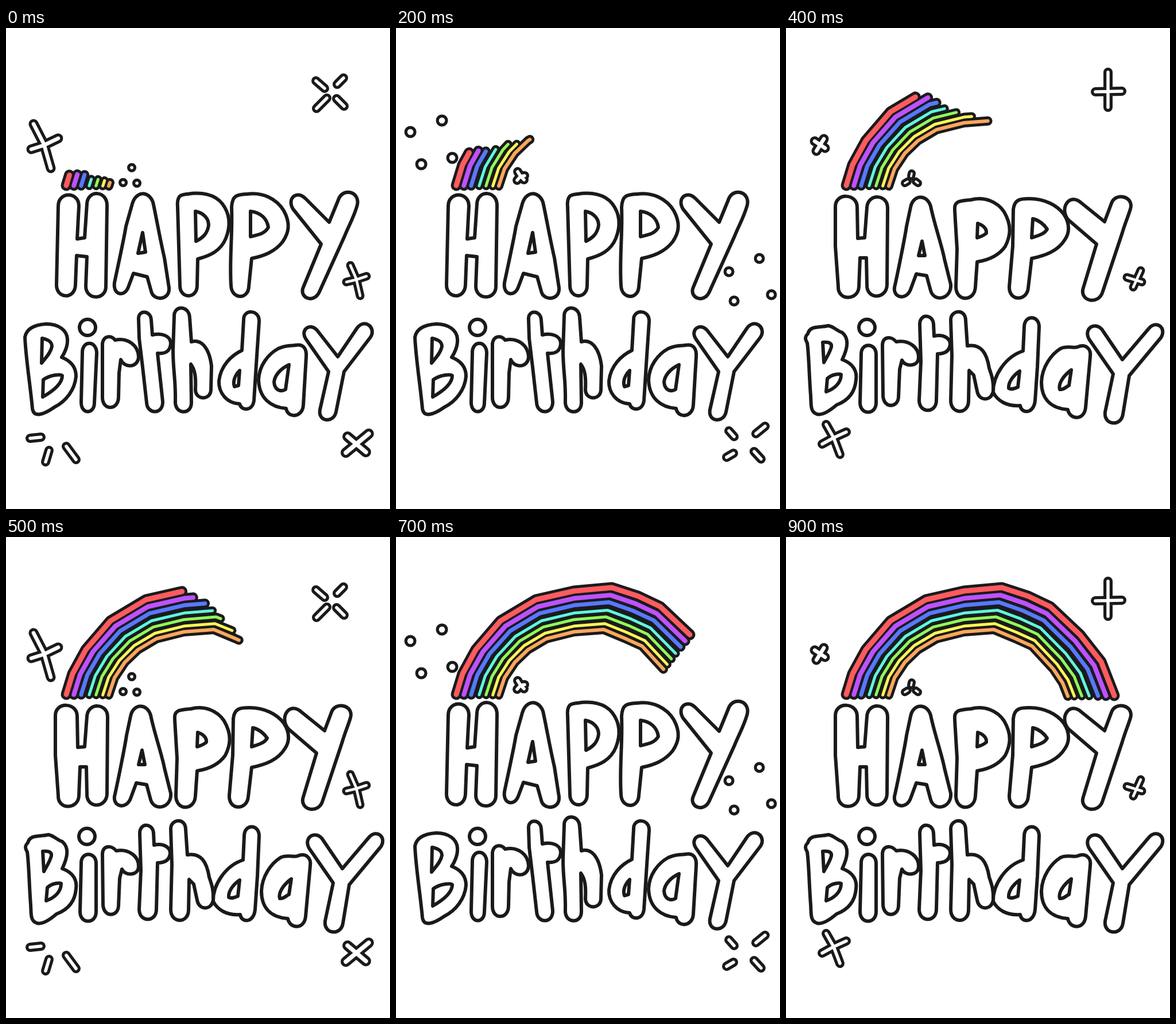
An HTML page with a canvas that plays this animation: 669 by 837 pixels, repeating every 1000 ms.

```html
<!DOCTYPE html>
<html lang="en">
<head>
<meta charset="utf-8">
<title>Happy Birthday</title>
<style>
html, body { margin: 0; width: 100%; height: 100%; overflow: hidden; background: #fff; }
canvas { display: block; }
</style>
</head>
<body>
<canvas id="stage" width="669" height="837"></canvas>
<script>
const ctx = document.getElementById('stage').getContext('2d');
const INK = '#1a1a1c';
const STEP = 100;

// Two hand-drawn poses of the lettering, one path per letter.
const poses = [[
  'M91 310C91 284 127 284 127 310L124 367 137 365 141 306C142 281 177 282 176 310L174 450C174 474 139 474 139 449L141 398 123 396 121 446C121 473 87 472 88 446Z',
  'M220 306C226 284 248 282 256 303C262 330 268 366 276 400L284 452C286 474 257 476 253 458L246 433 222 427 213 451C207 468 186 466 189 443C192 428 205 370 209 345ZM238 356L230 392 243 390Z',
  'M299 312C297 290 306 290 316 289C340 285 364 289 377 306C392 326 391 346 383 366C374 388 356 396 334 402L333 448C333 472 303 472 303 448ZM330 319C345 322 353 332 353 343C351 359 341 366 331 371Z',
  'M393 312C394 290 404 290 420 289C448 285 472 298 484 318C496 340 493 356 482 372C468 390 448 397 428 401L423 450C422 473 393 473 392 448C389 400 395 360 393 312ZM426 319C444 321 455 332 457 347C450 359 438 360 426 363Z',
  'M522 297L563 338 579 299C586 277 617 284 612 308C606 330 596 346 590 362L546 459C536 481 510 469 518 451L549 376 500 315C489 297 506 281 522 297Z',
  'M33 538C36 520 56 516 70 515C92 515 106 526 107 541C108 553 102 566 97 573C115 580 122 592 122 606C120 630 104 650 84 660C64 674 48 678 46 662C42 620 34 570 33 538ZM63 540C72 542 80 545 80 554C78 566 68 575 62 583ZM65 612C78 603 96 602 98 605C98 620 78 634 64 642Z',
  'M128 521a14 14 0 1 1 28 0a14 14 0 1 1-28 0ZM133 566C132 543 158 543 158 566L154 652C154 673 130 673 131 650Z',
  'M168 549C170 535 184 534 190 543C212 538 230 552 231 572C230 592 206 592 200 577L197 600 196 642C196 666 168 666 168 643Z',
  'M231 508C229 490 252 490 253 508L255 534C272 530 287 536 287 549C286 564 276 567 264 566L273 650C274 673 246 673 245 652L238 590 232 540Z',
  'M293 502C292 482 319 482 320 504L323 546C340 541 354 556 358 588L357 630C356 648 331 648 330 630C331 610 330 595 322 585L323 652C323 673 296 673 295 652C296 610 291 600 291 560Z',
  'M414 508C413 489 442 489 441 511L437 570 432 648C430 667 410 667 407 654C384 653 370 634 371 614C374 588 392 570 411 561ZM407 596C398 605 395 616 398 624L405 622Z',
  'M440 612C441 588 456 568 474 558C488 551 500 553 504 552C518 549 524 558 523 572L518 656C517 678 491 680 488 662C462 660 441 645 440 612ZM493 586C476 594 468 606 467 616C468 630 478 634 487 629Z',
  'M542 526L578 572 611 523C624 504 646 521 635 538L589 598 575 668C571 688 543 686 547 664L562 598 523 542C511 525 530 512 542 526Z'
], [
  'M86 312C85 286 124 287 124 312L125 366 137 365 141 312C143 287 177 289 177 313L176 446C176 473 140 473 141 447L140 400 129 400 127 450C126 475 90 475 91 450L86 380Z',
  'M217 312C221 290 245 288 252 310C258 340 272 380 276 402L287 446C289 472 258 478 252 457L245 431 227 428 217 455C209 476 183 469 190 447C196 420 208 360 210 345ZM237 371L231 396 242 396Z',
  'M294 318C292 300 304 301 322 299C346 293 368 302 380 320C394 344 391 362 382 380C370 397 352 404 333 407L330 450C329 477 296 477 296 450L298 385ZM334 340C344 343 350 350 349 357C344 362 339 363 333 365Z',
  'M396 316C398 298 408 297 424 297C450 297 472 308 484 324C496 342 493 358 486 368C474 388 452 396 428 401L422 452C420 476 388 476 389 450L395 380ZM430 332C440 334 450 342 455 350C450 359 440 361 428 365Z',
  'M514 304L555 337 567 305C574 285 607 293 600 315C596 328 590 342 586 356L552 458C545 484 510 475 518 452L541 376 492 334C475 314 494 286 514 304Z',
  'M37 548C32 540 34 536 38 532C42 517 58 522 74 518C84 520 90 528 98 530C110 540 108 556 98 577C118 584 124 598 122 612C120 638 104 650 88 656C74 668 62 674 54 672C42 668 44 656 43 640C40 600 40 570 37 548ZM64 547C76 546 80 549 79 555C76 566 70 574 66 582ZM72 610C82 601 94 602 96 603C96 618 84 628 70 633Z',
  'M127 521a14 14 0 1 1 28 0a14 14 0 1 1-28 0ZM131 568C130 547 157 547 157 568L157 652C157 674 129 674 129 652Z',
  'M168 552C168 536 184 536 192 546C214 542 232 556 231 574C230 590 207 590 202 578L198 594 196 642C195 662 170 662 169 640Z',
  'M233 516C233 496 256 498 257 515L258 536C274 532 286 540 286 550C285 564 274 567 264 567L262 648C262 671 232 671 232 648L235 580Z',
  'M287 508C287 490 313 488 313 509L316 553C340 549 350 566 354 592C359 606 362 616 361 632C358 650 336 650 333 632L327 604 319 596 318 650C317 673 287 673 287 648L289 570Z',
  'M415 520C415 499 441 499 441 520L438 590 434 648C432 672 410 672 408 657C384 659 368 648 361 634C360 606 382 572 413 562ZM407 597C394 606 387 618 388 627C393 630 399 627 404 625Z',
  'M445 616C446 590 462 568 478 558C490 552 502 558 508 555C522 549 532 558 530 572L522 660C520 684 494 682 491 664C462 662 445 646 445 616ZM497 595C482 606 474 620 477 629C484 630 488 624 493 622Z',
  'M550 524L586 577 632 523C645 507 664 522 653 539L598 605 587 672C584 694 553 692 556 668L570 602 529 543C517 525 536 510 550 524Z'
]].map(pose => pose.map(d => new Path2D(d)));

// Sparkle cycle: [outer width, path]; dots are tiny round-capped strokes.
const dots = (w, ...xy) => [w, xy.map((v, i) => i % 2 ? v + 'h.1' : 'M' + v + ' ').join('')];
const sparkles = [[
  [16, 'M540 92L555 105M577 98L588 87M541 140L559 122M576 123L589 136'],
  [17, 'M48 167L66 202 78 244M44 211L66 204 91 192'],
  dots(16, 219, 243, 204, 269, 228, 270),
  [15, 'M600 413L610 436 617 466M593 442L610 438 628 432'],
  [18, 'M592 739L632 706M595 711L627 738'],
  [16, 'M42 714L61 712M75 735L69 755M105 728L122 751']
], [
  dots(19, 529, 79, 601, 74, 528, 149, 596, 142),
  [17, 'M36 188L89 221M75 175L50 230'],
  [15, 'M580 425L593 433M628 408L619 423M626 445L641 457M605 454L598 468'],
  [17, 'M608 692L604 760M581 725L635 725'],
  dots(19, 26, 713, 64, 766, 129, 760)
], [
  dots(21, 25, 181, 80, 161, 44, 237, 98, 226),
  [16, 'M212 250L217 258 223 264M211 265L217 258 224 257'],
  dots(19, 580, 424, 633, 401, 654, 464, 589, 475),
  [16, 'M580 701L589 711M627 706L643 693M576 747L588 740M624 737L636 750']
], [
  [17, 'M549 97L577 121M548 122L581 96'],
  [0, 'M230 235Q224 253 235 268Q214 264 197 281Q206 264 193 250Q214 250 230 235Z'],
  dots(20, 575, 696, 647, 690, 570, 749, 636, 757),
  [16, 'M95 692L77 734M67 711L102 718']
], [
  [16, 'M561 77L561 138M539 111L585 110'],
  [17, 'M50 197L68 209M66 193L53 214'],
  [14, 'M219 253L218 258M207 270L212 267M226 267L230 270'],
  [15, 'M594 434L620 442M618 422L605 451'],
  [16, 'M70 690L83 713 94 742M63 724L83 713 105 703']
]].map(set => set.map(([w, d]) => [w, new Path2D(d)]));

// Rainbow: bands lie between an outer and an inner guide line.
const outer = [[105, 274], [116, 238], [139, 196], [182, 146], [244, 109], [310, 94],
  [376, 88], [422, 103], [460, 121], [512, 170], [549, 217], [572, 276]];
const inner = [[179, 275], [189, 245], [207, 218], [230, 196], [262, 177], [310, 165],
  [362, 161], [398, 176], [429, 190], [466, 230], [482, 254], [491, 277]];
// [colour, width, place between the guides]
const bands = [
  ['#ff5b5f', 9, 0], ['#bd52ff', 8, .18], ['#5878ff', 7, .35], ['#5ff7dc', 5, .54],
  ['#92fc58', 5, .7], ['#fff658', 5, .86], ['#ffa75c', 6, 1]
];
// How far along the guides each band has grown, per step.
const growth = [
  [.5, .55, .55, .35, .35, .3, .2],
  [1, 1.1, 1.1, 1.1, 1.3, 1.4, 1.6],
  [1.5, 1.65, 1.7, 1.9, 2.3, 2.5, 3.1],
  [2.35, 2.6, 2.75, 2.85, 3.2, 3.55, 4.2],
  [3.7, 4, 4.2, 4.4, 4.75, 5.25, 5.8],
  [4.95, 5.25, 5.6, 5.85, 6.2, 6.8, 7.25],
  [8, 8, 8.1, 8.1, 8.2, 8.35, 8],
  ...[9, 10, 11].map(u => Array(7).fill(u))
];

const mix = (a, b, t) => a.map((v, i) => v + (b[i] - v) * t);

function bandPath(place, end) {
  const line = outer.map((p, i) => mix(p, inner[i], place));
  const n = Math.floor(end);
  const pts = line.slice(0, n + 1);
  if (end > n) pts.push(mix(line[n], line[n + 1], end - n));
  const path = new Path2D();
  pts.forEach(p => path.lineTo(...p));
  return path;
}

function stroke(path, colour, width) {
  ctx.strokeStyle = colour;
  ctx.lineWidth = width;
  ctx.stroke(path);
}

function outline(path, width) {
  ctx.fillStyle = '#fff';
  ctx.fill(path);
  stroke(path, INK, width);
}

function draw(k) {
  ctx.fillStyle = '#fff';
  ctx.fillRect(0, 0, 669, 837);
  ctx.lineCap = ctx.lineJoin = 'round';

  poses[Math.floor(k / 3) % 2].forEach(p => outline(p, 6));

  for (const [w, path] of sparkles[k % 5]) {
    if (w) {
      stroke(path, INK, w);
      stroke(path, '#fff', w - 10.5);
    } else outline(path, 5.5);
  }

  const paths = bands.map(([, , place], i) => bandPath(place, growth[k][i]));
  paths.forEach((p, i) => stroke(p, INK, bands[i][1] + 10));
  paths.forEach((p, i) => stroke(p, bands[i][0], bands[i][1]));
}

function tick() {
  draw(Math.floor(performance.now() / STEP) % 10);
  requestAnimationFrame(tick);
}
tick();
</script>
</body>
</html>
```
